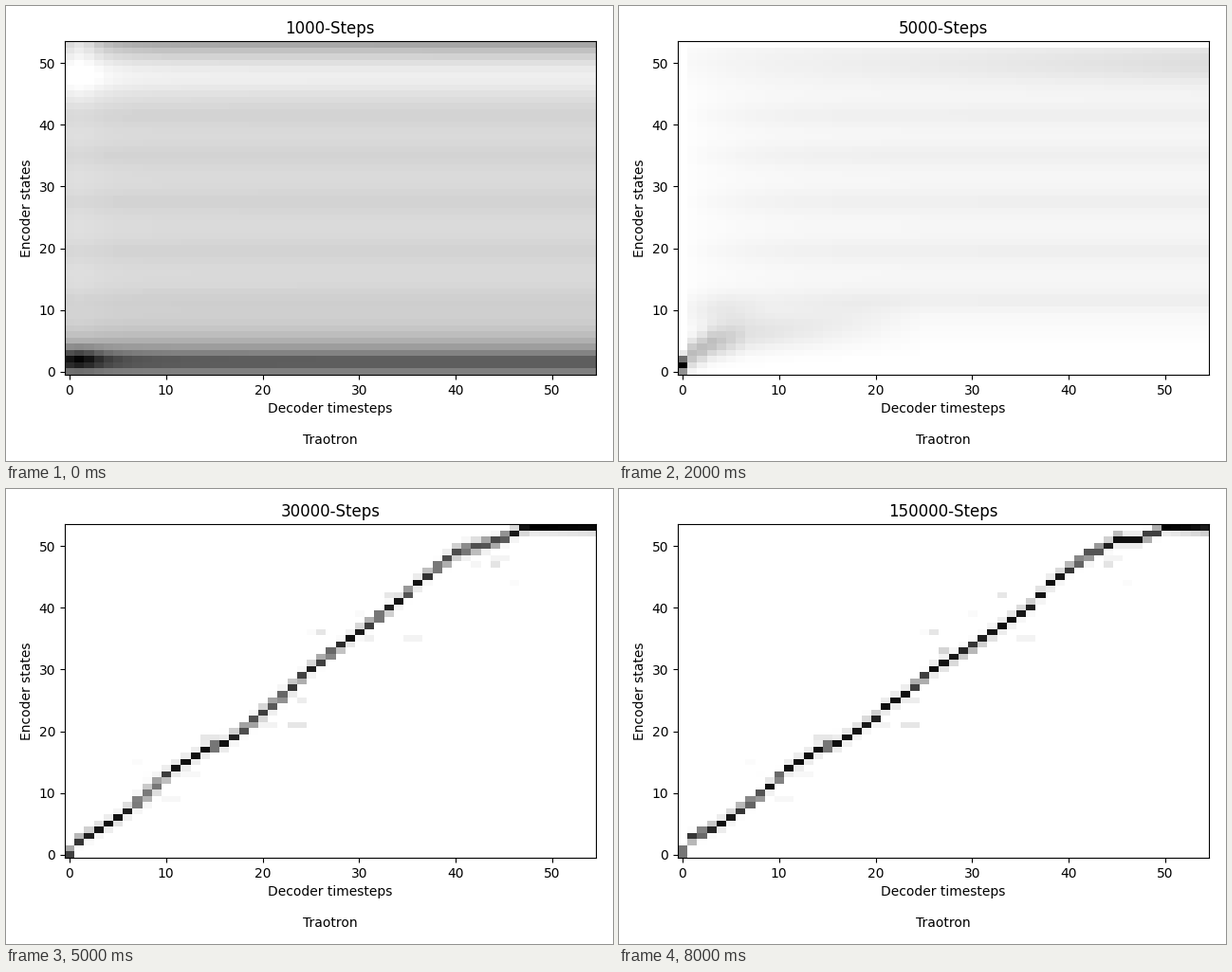
Write a matplotlib script that moves like this. It is 640x480 px and loops after 8500 ms.

```python
import numpy as np
import matplotlib.pyplot as plt
from matplotlib.animation import FuncAnimation

ROWS, COLS = 54, 55
W, H, DPI = 640, 480, 100
LEFT, BOTTOM, WIDTH, HEIGHT = 61.81, 91, 560.1, 351.6
rows = np.arange(ROWS)[:, None]
cols = np.arange(COLS)[None, :]
STEPS = [1000 * k for k in range(1, 11)] + [20000 * k + 10000 for k in range(1, 8)]


def bump(x, centre, width):
    return np.exp(-((x - centre) / width) ** 2 / 2)


def blob(cx, cy, sx, sy, amp):
    return amp * bump(cols, cx, sx) * bump(rows, cy, sy)


def ridge(knots, widen=1):
    """Soft line through (column, centre, spread, darkness) knots."""
    x, *parts = zip(*knots)
    centre, spread, amp = (np.interp(cols, x, p) for p in parts)
    return amp * bump(rows, centre, spread * widen)


def blend(a, b, t):
    return a + (b - a) * t


# Encoder states that draw a little more attention throughout early training
stripes = sum(bump(rows, centre, 1.3) for centre in (11.5, 19.5, 27.5, 35, 41.5))
from_top = ROWS - 1 - rows
across = cols / (COLS - 1)


def flat_start():
    settled = (.145 + .485 * .7 ** np.maximum(rows - 2, 0) + .03 * stripes
               - .09 * bump(rows, 48, 2) + .2 * .55 ** from_top - .13 * (rows == 0))
    contrast = (.37 * bump(rows, 2, 1.2) - .07 * bump(rows, 48, 3)
                - .2 * .6 ** from_top - .02)
    return settled + contrast / (1 + ((cols - 1) / 2.2) ** 2)


def fading_columns():
    base = (.045 + .025 * stripes + blend(.18, .27, across) * .84 ** rows
            + blend(.04, .13, across) * .7 ** from_top)
    first = np.exp(-np.maximum(rows - 1, 0) / 2)
    return blend(base, first, .3 ** cols)


def first_arc():
    haze = (.035 + .03 * stripes) * np.clip((rows - 2) / 9, 0, 1)
    d = haze * (1 - np.exp(-(cols + .5) / 6))
    d += bump(rows, 50, 2.4) * (.02 + .08 * across ** 1.5)
    d += ridge([(0, 2, 1.5, .27), (3, 4.6, 1.6, .25), (7, 6, 2, .1), (25, 9, 3, 0)])
    d += blob(4, 9.5, 2.6, 1.8, .07)
    d[53] = .01
    d[:, :1] = bump(rows, 1.1, .85)
    return d


def rough_diagonal():
    spine = [(0, .9, .8, .6), (4, 6, 1.1, .36), (7, 9.8, 1.9, .28), (10, 13, .8, .45),
             (12, 15, .7, .64), (15, 15.5, 1.3, .34), (18, 19.8, .9, .46),
             (22, 19.9, .8, .38), (24, 28, 3, .1), (27, 31, 3, .1),
             (31, 39, 1.4, .2), (36, 42, 1.8, .2), (39, 48.6, 1.6, .18),
             (44, 49.7, 1, .32), (54, 50, .9, .36)]
    d = ridge(spine) + .2 * ridge(spine, 2.6)
    d += blob(27, 30, 2.6, .6, .08) + blob(32, 42, 2, 2, .09) + blob(17, 23, 2, 1, .08)
    d += blob(36, 47, 3, 2, .09) + blob(48, 41, 9, 2, .06)
    d *= 1 + .12 * np.cos(np.pi * cols) * np.sin(1.3 * rows)
    d[:, :1] = bump(rows, .9, .75)
    return d


def path(*points):
    return np.interp(cols, *zip(*points))


PATHS = [
    path((0, .5), (1, 2.1), (6, 7), (9, 11.3), (10, 13), (14, 17), (16, 18), (18, 19.7),
         (20, 22), (25, 30), (32, 38), (36, 44), (40, 49), (43, 49.6), (47, 52.7),
         (48, 53)),
    path((0, .2), (1, 2.5), (5, 5.8), (11, 14), (14, 17), (16, 18), (20, 24),
         (22, 26), (24, 29), (30, 36.6), (32, 39), (35, 42.3), (36, 44), (40, 49),
         (43, 51), (44, 51), (47, 53), (54, 52.8)),
    path((0, .5), (1, 2.7), (4, 5), (8, 9.6), (11, 14), (14, 17), (16, 18), (20, 22.2),
         (21, 24), (23, 26), (26, 30), (30, 33.7), (33, 37), (36, 40.2), (38, 44),
         (42, 48.6), (45, 51), (47, 51), (50, 53), (54, 52.8)),
]


def stray_dashes(count=32):
    """Faint cells scattered around the path."""
    rng = np.random.default_rng(4)
    d = np.zeros((ROWS, COLS))
    for c in rng.integers(5, 47, count):
        r = int(PATHS[1][0, c] + rng.normal(0, 3.5))
        d[np.clip(r, 0, ROWS - 1), c:c + rng.integers(1, 3)] = rng.exponential(.04)
    return d


DASHES = stray_dashes()


def late_map(t):
    """Sharp alignment, t running from 0 to 1."""
    i = min(int(2 * t), 1)
    centre = blend(PATHS[i], PATHS[i + 1], 2 * t - i)
    blur = .7 * bump(cols, 8.3, 1) + .25 * bump(cols, 21, 2) + .35 * bump(cols, 41, 2)
    w = bump(rows, centre, .44 + (1 - t) ** 2 * blur)
    return np.maximum(1.08 * w / w.sum(axis=0), DASHES)


KEYS = [(0, flat_start()), (1, fading_columns()), (4, first_arc()),
        (6, rough_diagonal()), (8, late_map(0))]


def attention(i):
    if i >= 8:
        return late_map((i - 8) / 8)
    for (a, first), (b, last) in zip(KEYS, KEYS[1:]):
        if a <= i < b:
            return blend(first, last, (i - a) / (b - a))


fig = plt.figure(figsize=(W / DPI, H / DPI), dpi=DPI)
ax = fig.add_axes([LEFT / W, BOTTOM / H, WIDTH / W, HEIGHT / H])
image = ax.imshow(np.zeros((ROWS, COLS)), cmap="gray_r", vmin=0, vmax=1,
                  aspect="auto", origin="lower", interpolation="nearest")
title = ax.set_title("")
ax.set_xlabel("Decoder timesteps\n\nTraotron")
ax.set_ylabel("Encoder states")


def draw(i):
    image.set_data(np.clip(attention(i), 0, 1))
    title.set_text(f"{STEPS[i]}-Steps")
    return image, title


anim = FuncAnimation(fig, draw, frames=len(STEPS), interval=500, repeat=True, repeat_delay=0)
plt.show()
```
